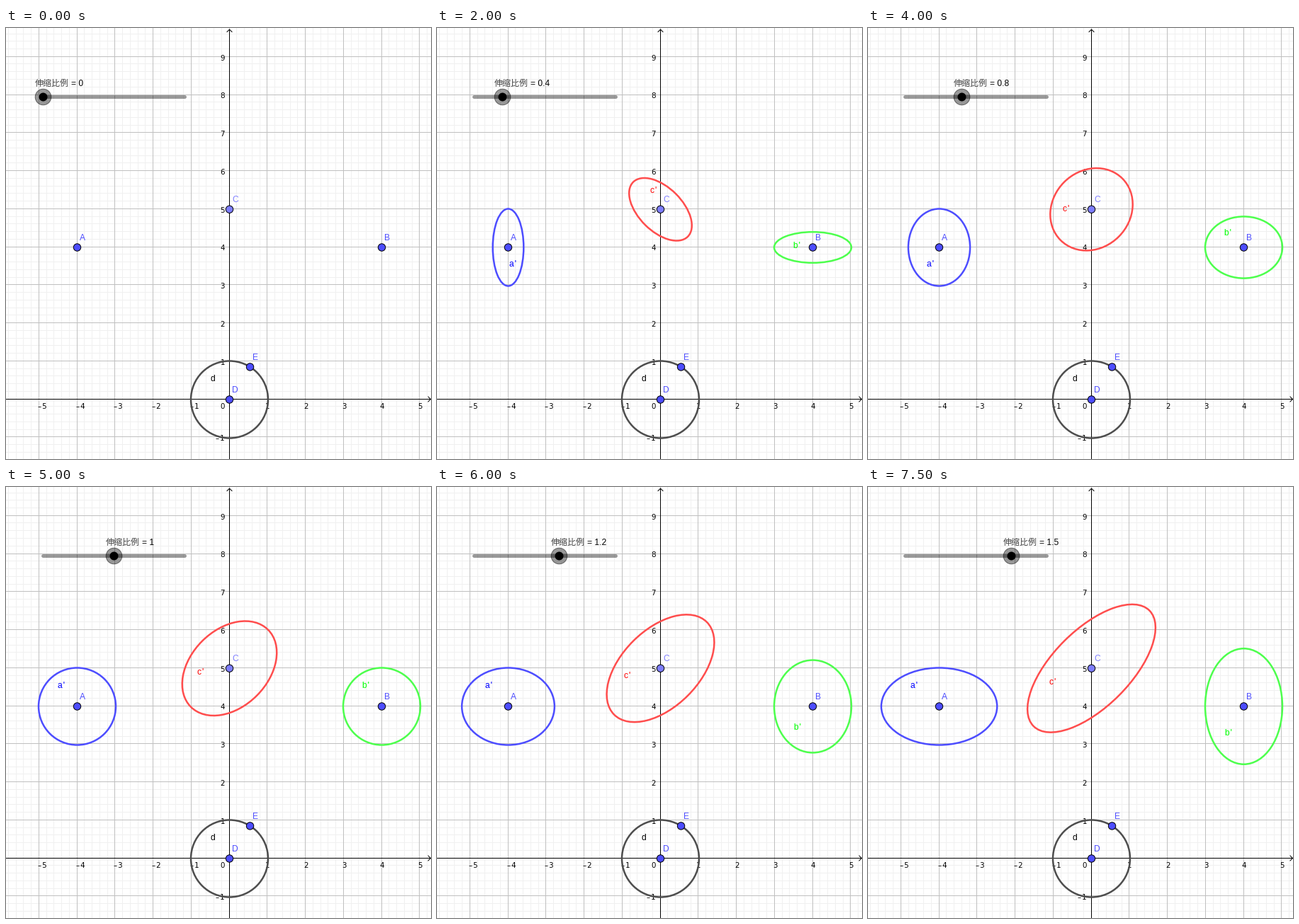
Recreate the animation shown at these times as a matplotlib script. Size 600 by 609 pixels, loop 8 s.

```python
import numpy as np
import matplotlib.pyplot as plt
from matplotlib.animation import FuncAnimation
from matplotlib.patches import Circle, Ellipse

W, H, DPI = 600, 609, 100
PX = 72 / DPI                      # one pixel in points
OX, OY, UNIT = 315.5, 525, 53.75
COL, ROW = 315, 524                # pixel column and row of the axes
R = 54.5                           # radius of the base circle in pixels
STEPS = 16
SANS = ["Liberation Sans", "DejaVu Sans"]

fig = plt.figure(figsize=(W / DPI, H / DPI), dpi=DPI, facecolor="white")
ax = fig.add_axes([0, 0, 1, 1])
ax.set_xlim(0, W)
ax.set_ylim(H, 0)
ax.axis("off")


def to_px(x, y):
    return OX + x * UNIT, OY - y * UNIT


def text(x, y, s, size=12, color="black", font=SANS, **kw):
    kw = {"ha": "left", "va": "baseline", "zorder": 6, **kw}
    return ax.text(x, y, s, fontsize=size * PX, color=color, family=font, **kw)


def line(xs, ys, color, width=1, **kw):
    kw = {"snap": False, **kw}
    return ax.plot(xs, ys, color=color, lw=width * PX, **kw)[0]


def column(n, color, z, top=0):
    """Vertical one-pixel line at n units, on whole pixels."""
    x = np.floor(COL + n * UNIT) + 0.5
    if 0 <= x <= W:
        line([x, x], [top, H], color, zorder=z, solid_capstyle="butt")


def row(n, color, z):
    """Horizontal one-pixel line at n units, on whole pixels."""
    y = np.floor(ROW - n * UNIT) + 0.5
    if 0 <= y <= H:
        line([0, W], [y, y], color, zorder=z, solid_capstyle="butt")


def draw_grid():
    for n in range(-30, 50):
        style = ("#c0c0c0", 1.5) if n % 5 == 0 else ("#f0f0f0", 1)
        column(n / 5, *style)
        row(n / 5, *style)


def draw_axes():
    column(0, "black", 2, top=2)
    row(0, "black", 2)
    x, y = COL + 0.5, ROW + 0.5
    line([x - 3.5, x, x + 3.5], [5.5, 2, 5.5], "black", zorder=2)
    line([W - 4, W - 0.5, W - 4], [y - 3.5, y, y + 3.5], "black", zorder=2)
    style = dict(size=10.3, font="DejaVu Sans", zorder=2.5)
    text(305.5, 538.5, "0", ha="center", **style)
    for n in range(-5, 10):
        if n == 0:
            continue
        s = str(n).replace("-", "\u2013\u200a")
        x, y = to_px(n, n)
        if n <= 5:
            text(x + (4.5 if n < 0 else 0.3), 538.5, s, ha="center", **style)
        if n >= -1:
            text(309, y + 4.3, s, ha="right", **style)


def draw_point(name, x, y, color="#4d4dff"):
    px, py = to_px(x, y)
    ax.add_patch(Circle((px, py), 5.2, fc=color, ec="black", lw=PX, zorder=5))
    text(px + 3.7, py - 10, name, color=color)


class Conic:
    """Ellipse whose first axis lies at `angle` degrees and gets stretched."""

    def __init__(self, name, x, y, angle, stroke, ink, gain=1):
        self.center = to_px(x, y)
        self.angle, self.gain = angle, gain
        self.patch = Ellipse(self.center, 2 * R, 2 * R, angle=-angle, fill=False,
                             ec=stroke, lw=2.5 * PX, zorder=4)
        ax.add_patch(self.patch)
        self.label = text(0, 0, name.replace("'", "\u200a'"), color=ink)

    def stretch(self, k):
        for part in (self.patch, self.label):
            part.set_visible(k > 0)
        a = R * k * self.gain
        self.patch.width = 2 * a
        # label sits inside the curve, in the frame of the major axis
        big, small = max(a, R), min(a, R)
        if np.isclose(a, R):
            turn = 0
        elif a > R:
            turn = self.angle
        else:
            turn = abs(self.angle - 90) * (1 if self.angle == 0 else -1)
        t = np.radians(turn)
        u, v = -big / 2, 0.85 * small - 20
        dx = u * np.cos(t) - v * np.sin(t)
        dy = u * np.sin(t) + v * np.cos(t)
        self.label.set_position((self.center[0] + dx, self.center[1] - dy))


draw_grid()
draw_axes()

Conic("d", 0, 0, 0, "#4d4d4d", "black").stretch(1)
conics = [
    Conic("a'", -4, 4, 0, "#4d4dff", "#0000ff"),
    Conic("b'", 4, 4, 90, "#4dff4d", "#00ff00"),
    Conic("c'", 0, 5, 45, "#ff4d4d", "#ff0000", gain=np.sqrt(2)),
]
draw_point("A", -4, 4)
draw_point("B", 4, 4)
draw_point("C", 0, 5, "#7d7dff")
draw_point("D", 0, 0)
draw_point("E", 0.54, 0.857)

# slider
SX, SY = 52.5, 97.5
line([SX, SX + 200], [SY, SY], (0, 0, 0, 0.4), 5, solid_capstyle="round", zorder=7)
knob = Circle((SX, SY), 11.3, fc=(0, 0, 0, 0.4), ec=(0, 0, 0, 0.5), lw=PX, zorder=8)
core = Circle((SX, SY), 6, fc="black", ec="none", zorder=9)
ax.add_patch(knob)
ax.add_patch(core)
caption = text(0, 82, "伸缩比例", color="#444444", font="Noto Sans CJK JP")
value = text(0, 82, "")


def update(i):
    k = i / 10
    x = SX + 100 * k
    knob.center = core.center = (x, SY)
    caption.set_x(x - 11.5)
    value.set_x(x + 39.5)
    value.set_text(f"= {k:g}")
    for c in conics:
        c.stretch(k)
    return []


anim = FuncAnimation(fig, update, frames=STEPS, init_func=lambda: update(0),
                     interval=500, repeat=True, repeat_delay=0, blit=False)
plt.show()
```
